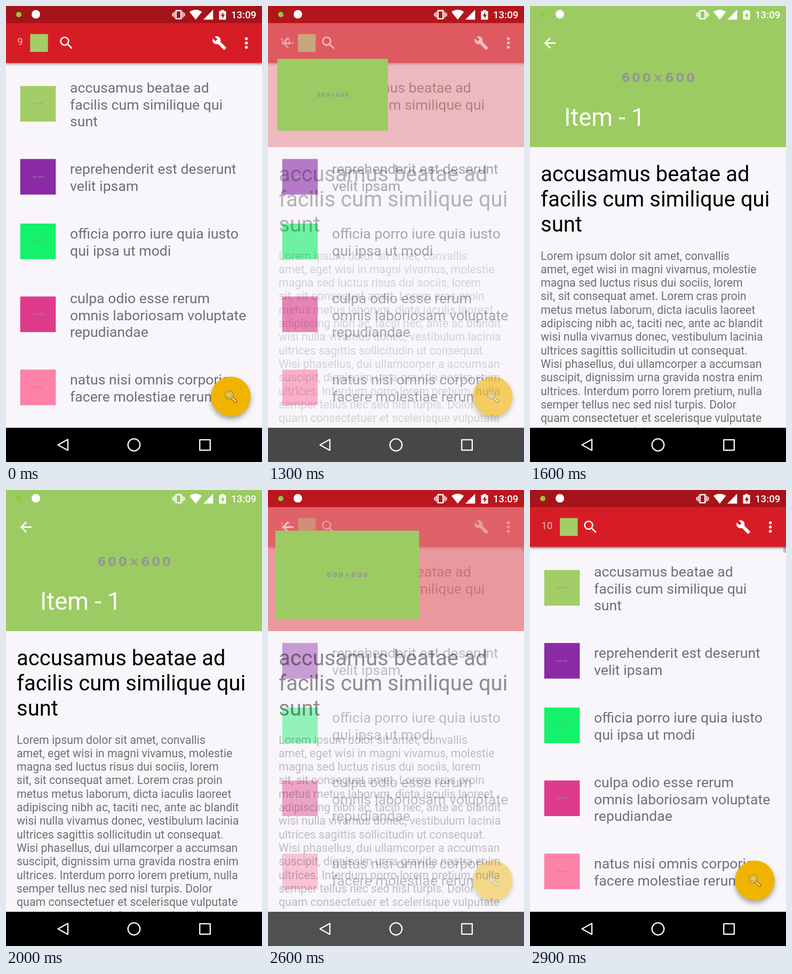
Recreate the animation shown at these times as an HTML page with a canvas. Size 480 px wide and 853 px high, loop 3 s.

```html
<!DOCTYPE html>
<html lang="la">
<head>
<meta charset="utf-8">
<title>List to detail transition</title>
<style>
html, body { margin: 0; width: 100%; height: 100%; overflow: hidden; background: #f8f6fa; }
canvas { display: block; width: 480px; height: 853px; }
</style>
</head>
<body>
<canvas id="stage" width="480" height="853"></canvas>
<script>
const W = 480, H = 853, LOOP = 3000, STEP = 100;
const BAR = 32, TOOLBAR = 106.5, HEADER = 264, NAV = 789;
const PAPER = '#f8f6fa', RED = '#d61d25', DARK_RED = '#a5141a';
const GREEN = '#9bcb62', GREY_TEXT = 'rgba(0,0,0,.55)';

const stage = document.getElementById('stage').getContext('2d');
const buffer = document.createElement('canvas');
buffer.width = W;
buffer.height = H;
const layer = buffer.getContext('2d');

const ICONS = {
  search: new Path2D('M15.5 14h-.79l-.28-.27A6.47 6.47 0 0 0 16 9.5 6.5 6.5 0 1 0 9.5 16c1.61 0 3.09-.59 4.23-1.57l.27.28v.79l5 4.99L20.49 19zm-6 0C7.01 14 5 11.99 5 9.5S7.01 5 9.5 5 14 7.01 14 9.5 11.99 14 9.5 14z'),
  wrench: new Path2D('M22.7 19l-9.1-9.1c.9-2.3.4-5-1.5-6.9-2-2-5-2.4-7.4-1.3L9 6 6 9 1.6 4.7C.4 7.1.9 10.1 2.9 12.1c1.9 1.9 4.6 2.4 6.9 1.5l9.1 9.1c.4.4 1 .4 1.4 0l2.3-2.3c.5-.4.5-1.1.1-1.4z'),
  back: new Path2D('M20 11H7.83l5.59-5.59L12 4l-8 8 8 8 1.41-1.41L7.83 13H20v-2z'),
  battery: new Path2D('M399.5 9.5h3.5v-2h6v2h3.5v16h-13zM407.5 11.5l-5 7h3v5l5-7h-3z')
};

const ROWS = [
  { y: 183, color: '#a3cd66', base: 162, lines: ['accusamus beatae ad', 'facilis cum similique qui', 'sunt'] },
  { y: 319.5, color: '#8a2ba5', base: 314, lines: ['reprehenderit est deserunt', 'velit ipsam'] },
  { y: 440.3, color: '#14f16b', base: 435, lines: ['officia porro iure quia iusto', 'qui ipsa ut modi'] },
  { y: 576.7, color: '#de3c8a', base: 556, lines: ['culpa odio esse rerum', 'omnis laboriosam voluptate', 'repudiandae'] },
  { y: 713.5, color: '#fc82a8', base: 708, lines: ['natus nisi omnis corporis', 'facere molestiae rerum'] }
];

const BODY = [
  'Lorem ipsum dolor sit amet, convallis',
  'amet, eget wisi in magni vivamus, molestie',
  'magna sed luctus risus dui sociis, lorem',
  'sit, sit consequat amet. Lorem cras proin',
  'metus metus laborum, dicta iaculis laoreet',
  'adipiscing nibh ac, taciti nec, ante ac blandit',
  'wisi nulla vivamus donec, vestibulum lacinia',
  'ultrices sagittis sollicitudin ut consequat.',
  'Wisi phasellus, dui ullamcorper a accumsan',
  'suscipit, dignissim urna gravida nostra enim',
  'ultrices. Interdum porro lorem pretium, nulla',
  'semper tellus nec sed nisl turpis. Dolor',
  'quam consectetuer et scelerisque vulputate',
  'cras massa urna, dolor sem quis nulla'
];

function box(c, x, y, w, h, color) {
  c.fillStyle = color;
  c.fillRect(x, y, w, h);
}

function disc(c, x, y, r, color) {
  c.fillStyle = color;
  c.beginPath();
  c.arc(x, y, r, 0, 7);
  c.fill();
}

function polygon(c, ...points) {
  c.beginPath();
  points.forEach(([x, y]) => c.lineTo(x, y));
  c.closePath();
}

function text(c, lines, x, y, size, pitch, color, weight = 400) {
  c.font = `${weight} ${size}px Roboto, sans-serif`;
  c.fillStyle = color;
  lines.forEach((line, i) => c.fillText(line, x, y + i * pitch));
}

function icon(c, path, cx, cy, scale) {
  c.save();
  c.translate(cx, cy);
  c.scale(scale, scale);
  c.translate(-12, -12);
  c.fillStyle = '#fff';
  c.fill(path);
  c.restore();
}

// Placeholder picture; its label scales with the width.
function picture(c, x, y, w, h, color) {
  box(c, x, y, w, h, color);
  c.save();
  c.translate(x + w / 2, y + h / 2);
  c.scale(w / W, w / W);
  c.font = 'bold 23px "DejaVu Sans", sans-serif';
  c.letterSpacing = '3.7px';
  c.textAlign = 'center';
  c.fillStyle = '#969696';
  c.fillText('600×600', 2, 8.5);
  c.restore();
}

function drawFab(c) {
  c.save();
  c.shadowColor = 'rgba(0,0,0,.35)';
  c.shadowBlur = 10;
  c.shadowOffsetY = 5;
  disc(c, 421.5, 730.5, 37.3, '#f0b400');
  c.restore();

  c.lineCap = 'round';
  for (const [width, color] of [[5.5, '#8a6410'], [3, '#f6dfa0']]) {
    c.lineWidth = width;
    c.strokeStyle = color;
    c.beginPath();
    c.moveTo(424.5, 733.5);
    c.lineTo(430.5, 739.5);
    c.stroke();
  }
  disc(c, 418.5, 727.5, 8, '#8a6410');
  disc(c, 418.5, 727.5, 7, '#f6dfa0');
  disc(c, 418.5, 727.5, 5.3, '#8a6410');
  disc(c, 418.5, 727.5, 4.6, '#f2c648');
}

function drawList(c, s) {
  for (const [i, row] of ROWS.entries()) {
    if (i || !s.overlay) picture(c, 26.7, row.y - 33.3, 66.6, 66.6, row.color);
    text(c, row.lines, 120, row.base, 26.67, 31.55, GREY_TEXT);
  }
  if (s.scrollbar) box(c, 475, 106, 5, 11.5, '#bdbcbf');
  drawFab(c);

  c.save();
  c.shadowColor = 'rgba(0,0,0,.4)';
  c.shadowBlur = 4;
  c.shadowOffsetY = 2;
  box(c, 0, BAR, W, TOOLBAR - BAR, RED);
  c.restore();
  box(c, 0, 0, W, BAR, DARK_RED);

  text(c, [s.count], 21.3, 72.5, 18.67, 0, 'rgba(255,255,255,.7)');
  picture(c, s.wide ? 56 : 45.3, 52.5, 33.4, 33.4, '#a3cd66');
  icon(c, ICONS.search, 113.3, 69.2, 4 / 3);
  icon(c, ICONS.wrench, 400, 69.2, 1.17);
  for (const y of [61.3, 69.3, 77.3]) disc(c, 450.7, y, 2.7, '#fff');
  box(c, 0, NAV, W, H - NAV, '#000');
}

function drawDetail(c, s) {
  box(c, 0, 0, W, HEADER, RED);
  if (!s.overlay) picture(c, 0, 0, W, 266, GREEN);
  c.clearRect(0, HEADER, W, 4);
  icon(c, ICONS.back, 37.3, 69.3, 4 / 3);
  text(c, ['Item - 1'], 64, 224, 45.33, 0, '#fff');
  text(c, ROWS[0].lines, 20, 327.5, 40, 47.1, '#000');
  text(c, BODY, 20, 474.5, 21.33, 25.33, GREY_TEXT);
  box(c, 0, NAV, W, H - NAV, '#000');
}

function drawStatus(c) {
  disc(c, 24, 16, 5, '#96c83c');
  disc(c, 56, 15.5, 8, '#fff');

  // vibrate
  c.strokeStyle = '#fff';
  c.lineCap = 'butt';
  c.lineWidth = 2.4;
  c.strokeRect(318.7, 8.7, 9.6, 15.2);
  c.lineWidth = 2;
  for (const [dx, h] of [[8, 5.5], [11, 3]]) {
    for (const x of [323.5 - dx, 323.5 + dx]) {
      c.beginPath();
      c.moveTo(x, 16.3 - h);
      c.lineTo(x, 16.3 + h);
      c.stroke();
    }
  }

  // wifi and signal
  c.fillStyle = '#fff';
  c.beginPath();
  c.moveTo(355.7, 25.5);
  c.lineTo(344, 11);
  c.quadraticCurveTo(355.7, 2.8, 367.4, 11);
  c.fill();
  polygon(c, [370, 25.5], [388.3, 25.5], [388.3, 7]);
  c.fill();

  c.fill(ICONS.battery, 'evenodd');
  text(c, ['13:09'], 422, 23.2, 18.67, 0, '#fff', 500);
}

function drawNav(c) {
  c.strokeStyle = '#fff';
  c.lineJoin = 'round';
  c.lineWidth = 2.3;
  polygon(c, [97.5, 821], [116, 810.8], [116, 831.2]);
  c.stroke();
  c.beginPath();
  c.arc(240, 821, 11.3, 0, 7);
  c.stroke();
  c.strokeRect(363.3, 811.3, 19.6, 19.6);
}

function drawLayer(alpha, draw, s) {
  if (alpha <= 0) return;
  layer.clearRect(0, 0, W, H);
  draw(layer, s);
  stage.globalAlpha = alpha;
  stage.drawImage(buffer, 0, 0);
  stage.globalAlpha = 1;
}

// cubic-bezier(.4, 0, .2, 1)
function ease(t) {
  if (t <= 0) return 0;
  if (t >= 1) return 1;
  let lo = 0, hi = 1, u;
  for (let i = 0; i < 30; i++) {
    u = (lo + hi) / 2;
    const x = 1.2 * u * (1 - u) ** 2 + 0.6 * u * u * (1 - u) + u ** 3;
    if (x < t) lo = u; else hi = u;
  }
  return u * u * (3 - 2 * u);
}

const mix = (a, b, p) => a + (b - a) * p;

function stateAt(t) {
  return {
    open: ease((t - 1213) / 300) - ease((t - 2494) / 300),
    overlay: (t >= 1300 && t < 1600) || (t >= 2400 && t < 2900),
    wide: t >= 1100,
    count: t < 1000 ? '9' : t < 1100 ? '1' : '10',
    scrollbar: t >= 2500
  };
}

function render(t) {
  const s = stateAt(t), p = s.open;
  box(stage, 0, 0, W, H, PAPER);
  box(stage, 0, 0, W, BAR, DARK_RED);
  box(stage, 0, NAV, W, H - NAV, '#fff');

  drawLayer((1 - p) ** 1.2, drawList, s);
  drawLayer(p ** 1.2, drawDetail, s);

  if (s.overlay) {
    const x = mix(26.7, 0, p), y = mix(149.7, 0, p);
    const right = mix(93.3, W, p), bottom = mix(216.3, 266.5, p);
    picture(stage, x, y, right - x, bottom - y, GREEN);
  }
  drawStatus(stage);
  drawNav(stage);
}

const start = performance.now();

function tick() {
  const t = (performance.now() - start) % LOOP;
  render(Math.floor(t / STEP) * STEP);
  requestAnimationFrame(tick);
}
tick();
</script>
</body>
</html>
```
